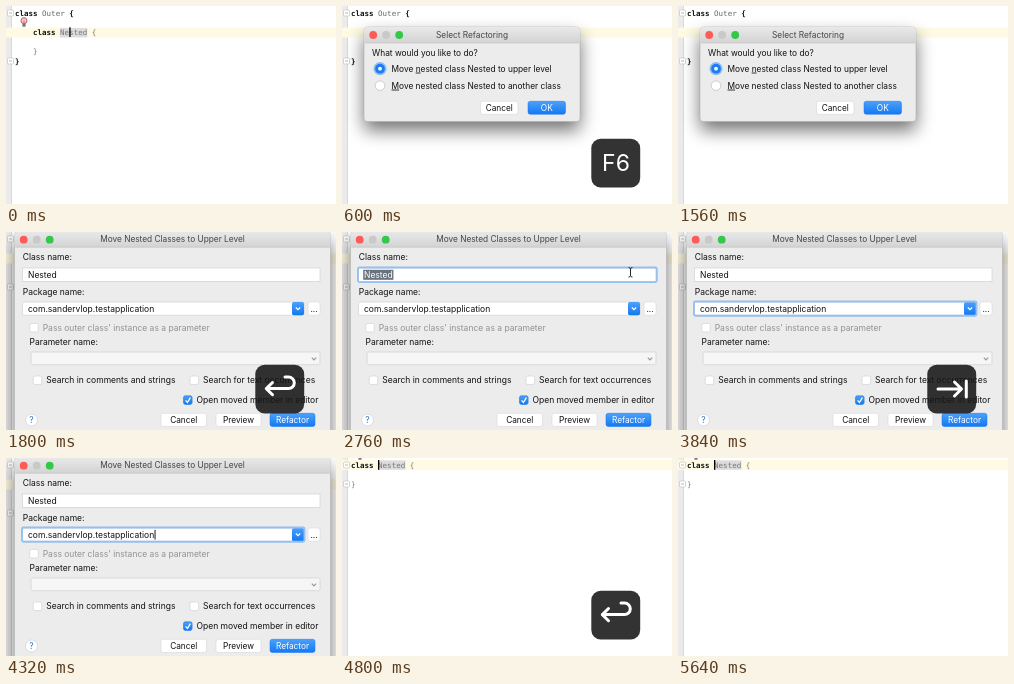
Write an HTML page that moves like this. It is 330x198 px and loops after 5760 ms.

```html
<!DOCTYPE html>
<html lang="en">
<head>
<meta charset="utf-8">
<title>Move nested class</title>
<style>
html, body { margin: 0; width: 100%; height: 100%; overflow: hidden; background: #fff; }
svg { display: block; width: 330px; height: 198px; }
text { white-space: pre; }
.code { font: 7.5px "DejaVu Sans Mono", monospace; }
.ui { font: 8.5px Inter, "Open Sans", sans-serif; }
.small { font-size: 8.3px; }
</style>
</head>
<body>
<svg id="stage" viewBox="0 0 330 198" xmlns="http://www.w3.org/2000/svg"></svg>
<script>
const LOOP = 5760, STEP = 120;
const stage = document.getElementById("stage");

const el = (tag, attrs, body = "") =>
  `<${tag} ${Object.entries(attrs).map(([k, v]) => `${k}="${v}"`).join(" ")}>${body}</${tag}>`;
const rect = (x, y, width, height, fill, more = {}) => el("rect", { x, y, width, height, fill, ...more });
const circle = (cx, cy, r, fill, more = {}) => el("circle", { cx, cy, r, fill, ...more });
const line = (d, stroke, width = 1, more = {}) =>
  el("path", { d, stroke, "stroke-width": width, fill: "none", ...more });
const label = (x, y, body, more = {}) => el("text", { x, y, fill: "#111", ...more }, body);
const centered = (x, y, body, more = {}) => label(x, y, body, { "text-anchor": "middle", ...more });
const group = (id, body, more = {}) => el("g", { id, ...more }, body);

// Editor
const keyword = '<tspan font-weight="bold" fill="#111">class</tspan>';
const fold = y => rect(1.5, y - 3, 6, 6, "#fff", { stroke: "#c4c4c4", "stroke-width": .7, rx: 1 }) +
  line(`M3 ${y}h3`, "#999", .7);
const bulb = (x, y) => circle(x, y + 3.2, 3, "#f3c9c9", { stroke: "#c45b5b", "stroke-width": 1 }) +
  rect(x - 1.6, y + 6.2, 3.2, 3, "#777") + line(`M${x} ${y + 3}v3`, "#c45b5b", .8);
const activeLine = y => rect(0, y, 330, 10, "#fffae3");
const identifier = (x, y) => rect(x, y, 27.2, 9.4, "#dcdcdc");
const gutter = rect(0, 0, 5.5, 198, "#ebebeb") + line("M5.5 0V198", "#d2d2d2", .8);

const outerFile = group("outerFile", gutter + activeLine(21.5) + identifier(54, 22) + fold(7) + fold(55) +
  label(9, 9.6, keyword + ' Outer <tspan fill="#111" font-weight="bold">{</tspan>', { fill: "#666" }) +
  label(27, 28.8, keyword + " Nested {", { fill: "#777" }) +
  label(27, 48, "}", { fill: "#777" }) +
  label(9, 57.6, "}", { "font-weight": "bold" }) +
  group("outerBulb", bulb(18, 11.5)) +
  group("outerCaret", rect(63.3, 21.3, 1.3, 9.7, "#000")), { class: "code" });

const nestedFile = group("nestedFile", gutter + activeLine(2) + group("nestedMark", identifier(36.2, 2.4)) +
  fold(7) + fold(26) +
  label(9, 9.6, keyword + " Nested {", { fill: "#777" }) +
  label(9, 28.8, "}", { fill: "#777" }) +
  group("nestedBulb", bulb(18, -7.5)) +
  group("nestedCaret", rect(36, 2, 1.3, 9.8, "#000")), { class: "code" });

// Dialog parts
const windowFrame = (x, y, w, h, bar, title) =>
  rect(x, y, w, h, "#000", { rx: 4, opacity: .55, filter: "url(#blur)", transform: "translate(0 9)" }) +
  rect(x, y, w, h, "#ececec", { rx: 3.5, stroke: "#aaa", "stroke-width": .5 }) +
  rect(x, y, w, bar, "url(#bar)", { rx: 3.5 }) +
  line(`M${x} ${y + bar}h${w}`, "#bdbdbd", .6) +
  ["#fc5b57", "#c9c9c9", "#34c84a"].map((c, i) => circle(x + 9.2 + i * 13, y + 8, 3.9, c)).join("") +
  centered(x + w / 2, y + 10.7, title, { fill: "#444", class: "small" });
const button = (x, y, w, h, text, primary) =>
  rect(x, y, w, h, primary ? "url(#blue)" : "#fff", { rx: 2.3, stroke: primary ? "#1a76e8" : "#d0d0d0", "stroke-width": .5 }) +
  centered(x + w / 2, y + h / 2 + 2.9, text, { fill: primary ? "#fff" : "#111", class: "small" });
const field = (x, y, w, h, fill = "#fff", rx = 0) =>
  rect(x, y, w, h, fill, { rx, stroke: "#cbcbcb", "stroke-width": .6 });
const chevron = (x, y, color) => line(`M${x - 2.2} ${y - 1}l2.2 2.2l2.2 -2.2`, color, 1.2);
const checkbox = (x, y, text, { on = false, color = "#111" } = {}) =>
  rect(x, y, 8.6, 8.6, on ? "url(#blue)" : "#fff", { rx: 1.8, stroke: on ? "#1a76e8" : "#cdcdcd", "stroke-width": .6 }) +
  (on ? line(`M${x + 2} ${y + 4.6}l1.9 2.1l3 -4.8`, "#fff", 1.3) : "") +
  label(x + 13, y + 7.3, text, { fill: color });
const focusRing = (id, x, y, w, h) =>
  group(id, rect(x, y, w, h, "none", { rx: 1.5, stroke: "#96c0ee", "stroke-width": 1.9 }));
const mnemonic = c => `<tspan text-decoration="underline">${c}</tspan>`;

const choiceDialog = group("choiceDialog",
  windowFrame(22, 21, 216, 94.5, 16, "Select Refactoring") +
  label(30, 50, "What would you like to do?") +
  circle(38, 62.7, 6.6, "#8fbff5") + circle(38, 62.7, 4.9, "#1d7cf2") + circle(38, 62.7, 1.9, "#fff") +
  circle(38, 79.7, 4.8, "#fff", { stroke: "#bdbdbd", "stroke-width": .7 }) +
  label(49.5, 65.6, `Move ${mnemonic("n")}ested class Nested to upper level`) +
  label(49.5, 82.6, `${mnemonic("M")}ove nested class Nested to another class`) +
  button(138.5, 95.3, 37.5, 13, "Cancel") + button(186, 95.3, 37.5, 13, "OK", true),
  { class: "ui", style: "font-size:8.35px" });

const moveDialog = group("moveDialog",
  windowFrame(8.5, -.3, 316, 215, 15.5, "Move Nested Classes to Upper Level") +
  label(16.8, 28.3, "Class name:") + field(16.5, 36, 297.5, 13.6) +
  focusRing("nameRing", 16, 35.5, 298.8, 14.6) +
  rect(21.2, 37.8, 0, 10, "#69737f", { id: "selection" }) +
  label(22, 46, "Nested", { id: "nameText" }) +
  label(16.8, 63.3, "Package name:") + field(16.5, 70, 281.5, 13.2, "#fff", 1.5) +
  rect(286, 70, 12, 13.2, "url(#blue)", { rx: 1.8 }) + chevron(292, 76.5, "#fff") +
  focusRing("packageRing", 16, 69.5, 282.5, 14.2) +
  label(22, 79.5, "com.sandervlop.testapplication", { id: "packageText" }) +
  rect(0, 71.8, .9, 9.8, "#000", { id: "packageCaret" }) +
  button(302, 70, 12, 13.2, "...") +
  checkbox(23.7, 91.4, "Pass outer class' instance as a parameter", { color: "#929292" }) +
  label(23.5, 113, "Parameter name:") + field(25, 120, 289, 12.7, "#f6f6f6", 1.5) + chevron(308, 126.6, "#999") +
  checkbox(27.2, 144, "Search in comments and strings") +
  checkbox(184, 144, "Search for text occurrences") +
  checkbox(177.5, 163.8, "Open moved member in editor", { on: true }) +
  circle(25.5, 188, 6, "#fff", { stroke: "#cbcbcb", "stroke-width": .6 }) + centered(25.5, 191, "?", { fill: "#2b6fc4" }) +
  button(155, 181.3, 45.5, 13.2, "Cancel") + button(210, 181.3, 45, 13.2, "Preview") +
  button(264, 181.3, 45, 13.2, "Refactor", true) +
  group("pointer", line("M286.5 35.5q2 0 2 1.6v6.4q0 1.6 -2 1.6M290.5 35.5q-2 0 -2 1.6v6.4q0 1.6 2 1.6", "#222", .9)),
  { class: "ui" });

// Key overlay
const glyph = (id, d) => group(id, line(d, "#fff", 3, { "stroke-linejoin": "round", "stroke-linecap": "round" }));
const overlay = group("overlay", rect(249.3, 132.7, 48.9, 48.9, "#151515", { rx: 9.5, opacity: .87 }) +
  group("keyMove", centered(274, 165, "F6", { fill: "#fff", style: "font-size:23px" })) +
  glyph("keyReturn", "M279 145H282.5a5.8 5.8 0 0 1 0 11.6H260.5M266.5 150.5L260.3 156.6L266.5 162.7") +
  glyph("keyTab", "M260 157H283M276.5 150L283.5 157L276.5 164M288.3 149V165"), { class: "ui" });

const gradient = (id, from, to) => el("linearGradient", { id, x1: 0, x2: 0, y1: 0, y2: 1 },
  el("stop", { offset: 0, "stop-color": from }) + el("stop", { offset: 1, "stop-color": to }));
stage.innerHTML = el("defs", {}, gradient("bar", "#e9e9e9", "#d3d3d3") + gradient("blue", "#4ba0fa", "#1279f4") +
  el("filter", { id: "blur", x: "-30%", y: "-50%", width: "160%", height: "200%" },
    el("feGaussianBlur", { stdDeviation: 9 }))) +
  outerFile + nestedFile + choiceDialog + moveDialog + overlay;

const node = id => document.getElementById(id);
const show = (id, on) => node(id).setAttribute("display", on ? "inline" : "none");

const CHOICE = 600, MOVE = 1800, NAME_FOCUS = 1920, PACKAGE_FOCUS = 3240, DONE = 4560;
const presses = [["keyMove", 360], ["keyReturn", 1680], ["keyTab", 3120], ["keyReturn", DONE]];
const HOLD = 840, FADE = 360;

const nameWidth = node("nameText").getComputedTextLength();
const packageWidth = node("packageText").getComputedTextLength();
node("selection").setAttribute("width", nameWidth + 1.5);
node("packageCaret").setAttribute("x", 22.4 + packageWidth);

function drawOverlay(t) {
  const press = presses.find(([, start]) => t >= start && t < start + HOLD + FADE - STEP);
  show("overlay", press);
  if (!press) return;
  const age = t - press[1];
  node("overlay").setAttribute("opacity", age < HOLD ? 1 : 1 - (age - HOLD + STEP) / FADE);
  for (const key of ["keyMove", "keyReturn", "keyTab"]) show(key, key === press[0]);
}

function draw(time) {
  const t = Math.floor((time % LOOP) / STEP) * STEP;
  const within = (from, to) => t >= from && t < to;
  show("outerFile", t < DONE);
  show("outerCaret", t < 120);
  show("outerBulb", t < CHOICE);
  show("nestedFile", t >= DONE);
  show("nestedMark", t >= 4800);
  show("nestedBulb", t >= 4800);
  show("nestedCaret", !within(5160, 5640));
  show("choiceDialog", within(CHOICE, MOVE));
  show("moveDialog", within(MOVE, DONE));

  const naming = within(NAME_FOCUS, PACKAGE_FOCUS);
  for (const id of ["nameRing", "selection", "pointer"]) show(id, naming);
  node("nameText").setAttribute("fill", naming ? "#fff" : "#111");
  show("packageRing", t >= PACKAGE_FOCUS);
  show("packageCaret", t >= PACKAGE_FOCUS && (t - PACKAGE_FOCUS) % 960 < 480);
  drawOverlay(t);
}

const start = performance.now();
function tick() {
  draw(performance.now() - start);
  requestAnimationFrame(tick);
}
draw(0);
requestAnimationFrame(tick);
</script>
</body>
</html>
```
